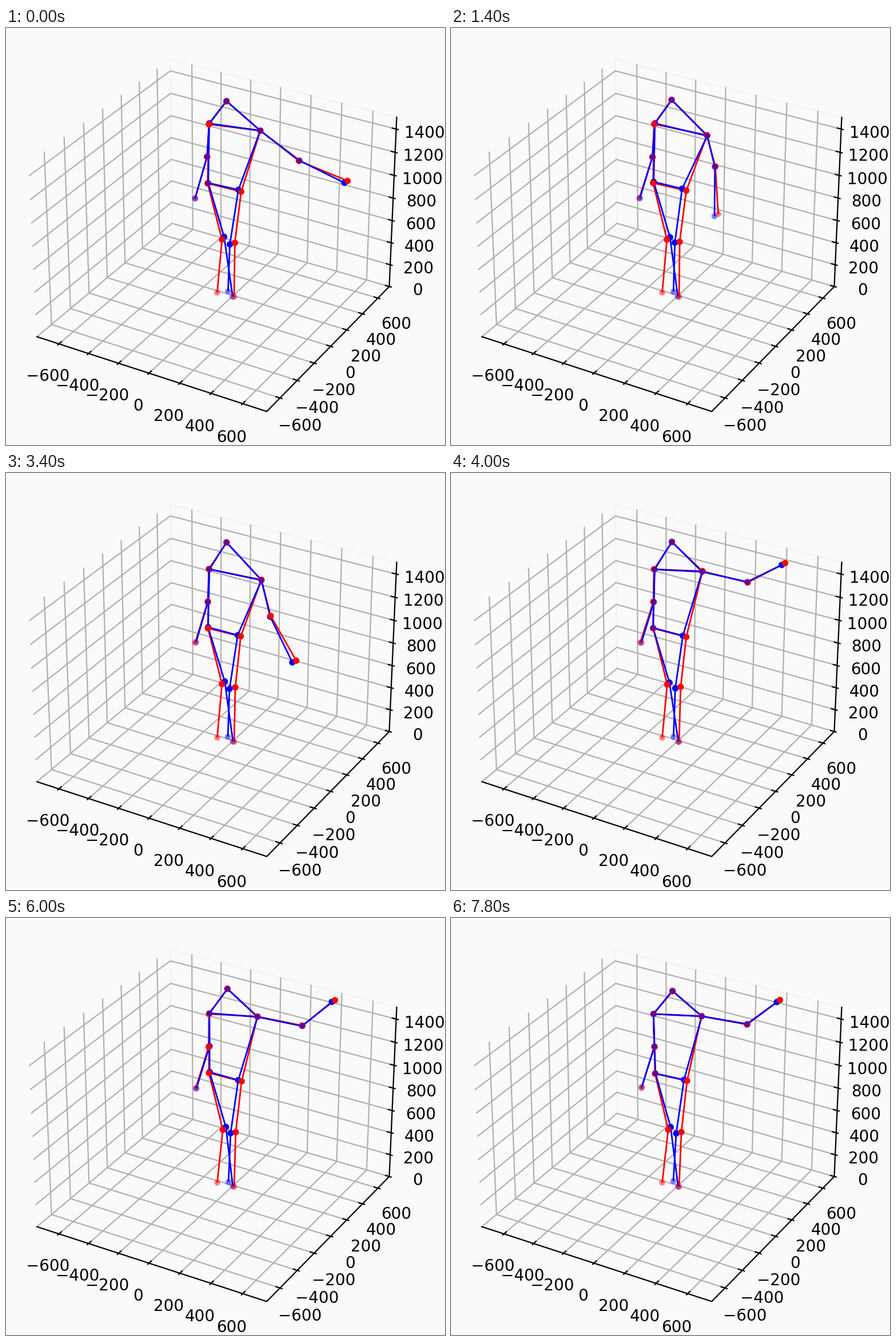
These frames come from a looping animation (768 by 729 pixels, 8 s). A matplotlib script:

```python
import numpy as np
import matplotlib.pyplot as plt
from matplotlib.animation import FuncAnimation
from matplotlib.collections import LineCollection

W, H, DPI = 768, 729, 200
FRAMES, STEP = 40, 200
A, B = 4 / 7, 3 / 7                 # half sizes of the plot box
FALL, RISE, PEAK = 850, 950, 600    # arm timing in ms

fig = plt.figure(figsize=(W / DPI, H / DPI), dpi=DPI, facecolor="#fafafa")
ax = fig.add_axes([0, 0, 1, 1])
ax.set_xlim(0, W)
ax.set_ylim(H, 0)
ax.axis("off")


# ---- static 3D box, seen from elevation 30, azimuth -60 ----
def project(x, y, z):
    c, s = np.sqrt(3) / 2, 0.5
    depth = 10 - (c * s * x - c * c * y + s * z)
    right = c * x + s * y
    up = -s * s * x + s * c * y + c * z
    return 367.8 + 4031 * right / depth, 348.6 - 4031 * up / depth


def path(*pts, **style):
    ax.plot(*zip(*(project(*p) for p in pts)), **style)


def label(value, p, dx=1.0, dy=0.0):
    x, y = project(*p)
    ax.text(x + dx, y + dy + 10.1, f"{value}".replace("-", "\u2212"),
            fontsize=10, family="DejaVu Sans", ha="center", va="baseline")


grid = dict(color="#b0b0b0", lw=0.8, zorder=1)
edge = dict(color="black", lw=0.8, zorder=2)
T_IN, T_OUT = 0.019, 0.0095

path((-A, A, -B), (-A, A, B), (A, A, B), color="#eeeeee", lw=0.5, zorder=0)
for v in range(-600, 601, 200):
    q = v / 750 * A
    path((q, -A, -B), (q, A, -B), (q, A, B), **grid)
    path((A, q, -B), (-A, q, -B), (-A, q, B), **grid)
    path((q, -A - T_OUT, -B), (q, -A + T_IN, -B), **edge)
    path((A + T_OUT, q, -B), (A - T_IN, q, -B), **edge)
    label(v, (q, -A - 0.097, -B - 0.1056))
    label(v, (A + 0.094, q, -B - 0.104))
for v in range(0, 1401, 200):
    q = (v / 750 - 1) * B
    path((-A, -A, q), (-A, A, q), (A, A, q), **grid)
    path((A + T_OUT, A, q), (A - T_IN, A, q), **edge)
    label(v, (A, A, q), 49.8, 5)
path((-A, -A, -B), (A, -A, -B), (A, A, -B), (A, A, B), **edge)


# ---- skeleton: points are complex numbers x + iy in pixels ----
REST = {"head": 385.5 + 124j, "sh_l": 353.7 + 167.5j, "el_l": 352.2 + 224.5j,
        "ha_l": 330.5 + 296.8j, "hip_l": 353 + 271j, "hip_r": 410.8 + 284.8j,
        "kn_l": 377.2 + 369j, "kn_r": 400.6 + 374j,
        "ft_l": 369 + 462j, "ft_r": 398.5 + 469.5j}
# how far the blue figure strays from the red one
STRAY = {"ha_l": 1.2, "hip_l": 1 - 1.5j, "hip_r": -5.5 - 2.5j,
         "kn_l": 4.3 - 4.5j, "kn_r": -9.3 + 2j, "ft_l": 27.5 + 7.5j,
         "ft_r": -10 - 9j, "ha_r": -5.5 + 3j}
# waving arm: bone angles (degrees below level) and lengths by lift
LIFT = [0, 0.06, 0.2, 0.3, 0.56, 1]
UPPER = [75, 76, 47.5, 38, 26, 11], [55, 66, 80, 85, 81, 81]
FORE = [90, 60, 27, 23, 0, -37], [83, 89, 97, 92, 86, 71]

BONES = [("head", "sh_l"), ("head", "sh_r"), ("sh_l", "sh_r"),
         ("sh_l", "el_l"), ("el_l", "ha_l"), ("sh_r", "el_r"),
         ("el_r", "ha_r"), ("sh_l", "hip_l"), ("sh_r", "hip_r"),
         ("hip_l", "hip_r"), ("hip_l", "kn_l"), ("kn_l", "ft_l"),
         ("hip_r", "kn_r"), ("kn_r", "ft_r")]
JOINTS = [*REST, "sh_r", "el_r", "ha_r"]
FEET = {"ft_l", "ft_r"}

rng = np.random.default_rng(4)
NOISE = rng.normal(size=(FRAMES, 2, len(JOINTS), 2)) @ np.array([1, 1j])


def lift(ms):
    """Arm height from 1 (raised) to 0 (hanging) and back, eased."""
    t = (ms - PEAK) % (FALL + RISE)
    turn = t / FALL if t < FALL else 1 + (t - FALL) / RISE
    return (1 + np.cos(np.pi * turn)) / 2


def bone(u, angles, lengths):
    turn = np.radians(np.interp(u, LIFT, angles))
    return np.interp(u, LIFT, lengths) * np.exp(1j * turn)


def figures(frame):
    """Joint positions of the red and the blue figure."""
    ms = frame * STEP
    u, lean = lift(ms), 2.5 * (frame / FRAMES) ** 2
    red = {j: p + (0 if j in FEET else lean) for j, p in REST.items()}
    red["head"] += 3.7j * np.cos(2 * np.pi * ms / 8500) - lean / 2
    red["sh_l"] -= lean / 2
    red["sh_r"] = 447.5 - 9 * u + 1j * (171 + 17 * (1 - u) ** 2)
    red["el_r"] = red["sh_r"] + bone(u, *UPPER)
    red["ha_r"] = red["el_r"] + bone(u, *FORE)
    blue = {}
    for i, j in enumerate(JOINTS):
        if j not in FEET:
            red[j] += 0.5 * NOISE[frame, 0, i]
        blue[j] = red[j] + STRAY.get(j, 0) + 0.7 * NOISE[frame, 1, i]
    return red, blue


def xy(p):
    return p.real + 0.5, p.imag + 0.5


sticks = [LineCollection([], colors=c, linewidths=1, zorder=z)
          for c, z in (("red", 3), ("blue", 4))]
for s in sticks:
    ax.add_collection(s)
dots = ax.scatter(np.zeros(2 * len(JOINTS)), np.zeros(2 * len(JOINTS)),
                  s=7, linewidths=1.4, zorder=5)


def update(frame):
    red, blue = figures(frame)
    for s, p in zip(sticks, (red, blue)):
        s.set_segments([[xy(p[a]), xy(p[b])] for a, b in BONES])
    faint = FEET | {"ha_l"}
    if lift(frame * STEP) < 0.04:
        faint = faint | {"ha_r"}
    spots, colors = [], []
    for j in JOINTS:
        alpha = 0.35 if j in faint else 1
        pair = [(red[j], (1, 0, 0, alpha)), (blue[j], (0, 0, 1, alpha))]
        if abs(red[j] - blue[j]) > 1.5:
            pair.reverse()
        elif j not in faint:
            pair[1] = blue[j], (0, 0, 1, 0.45)   # near ones blend to purple
        for p, color in pair:
            spots.append(xy(p))
            colors.append(color)
    dots.set_offsets(spots)
    dots.set_facecolor(colors)
    dots.set_edgecolor(colors)
    return [*sticks, dots]


anim = FuncAnimation(fig, update, frames=FRAMES, interval=STEP, repeat=True,
                     repeat_delay=0, blit=False)
plt.show()
```
